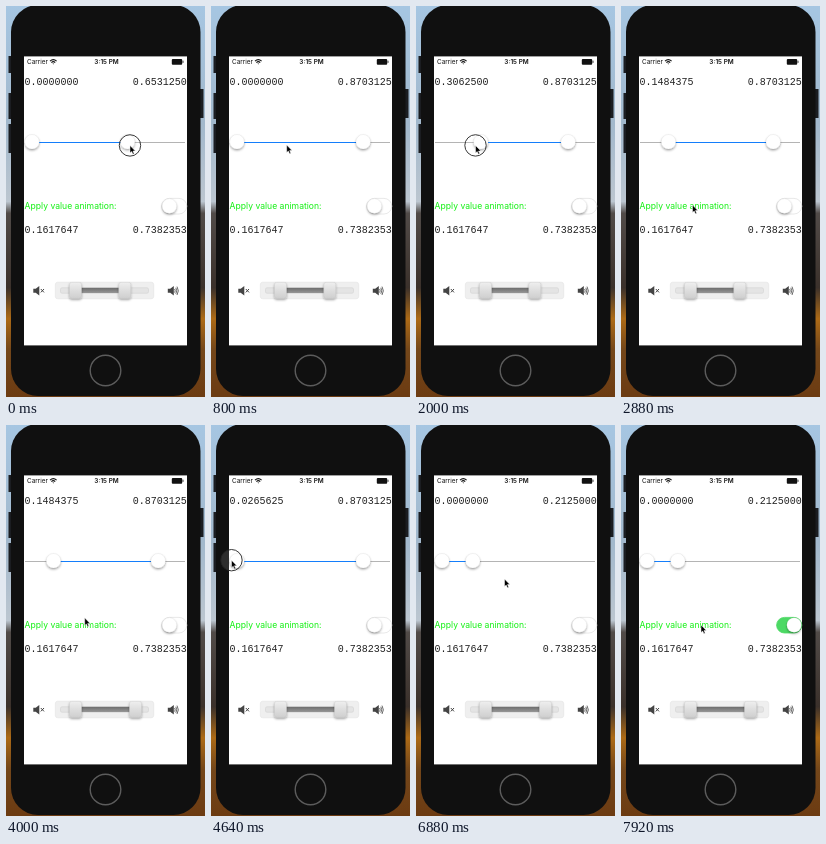
An HTML page that plays this animation: 199x391 px, repeating every 8 s.

```html
<!DOCTYPE html>
<html lang="en">
<head>
<meta charset="utf-8">
<title>Range sliders</title>
<style>
html, body { margin: 0; width: 100%; height: 100%; overflow: hidden; background: #8ea8bd; }
svg { display: block; width: 100vw; height: 100vh; }
text { font-family: Inter, Roboto, sans-serif; }
.num { font: 10px "Liberation Mono", "Courier New", monospace; fill: #222; }
.status { font-size: 6.4px; fill: #111; }
</style>
</head>
<body>
<svg viewBox="0 0 199 391" xmlns="http://www.w3.org/2000/svg">
  <defs>
    <linearGradient id="sky" x2="0" y2="1">
      <stop offset="0" stop-color="#a6c6e2"/>
      <stop offset=".3" stop-color="#a2b8cc"/>
      <stop offset=".5" stop-color="#bcc6d0"/>
      <stop offset=".53" stop-color="#514b48"/>
      <stop offset=".72" stop-color="#3b312b"/>
      <stop offset=".8" stop-color="#ac6a16"/>
      <stop offset=".88" stop-color="#74471a"/>
      <stop offset="1" stop-color="#6c3b12"/>
    </linearGradient>
    <linearGradient id="metal" x2="0" y2="1">
      <stop offset="0" stop-color="#efefef"/>
      <stop offset=".5" stop-color="#dedede"/>
      <stop offset="1" stop-color="#cfcfcf"/>
    </linearGradient>
    <linearGradient id="bar" x2="0" y2="1">
      <stop offset="0" stop-color="#6c6c6c"/>
      <stop offset="1" stop-color="#979797"/>
    </linearGradient>
    <filter id="shadow" x="-50%" y="-50%" width="200%" height="220%">
      <feDropShadow dx="0" dy="1.4" stdDeviation="1.2" flood-color="#000" flood-opacity=".36"/>
    </filter>
    <circle id="knob" r="7.3" fill="#fff" stroke="#000" stroke-opacity=".12" stroke-width=".4" filter="url(#shadow)"/>
    <rect id="grip" x="-6" y="276.3" width="12" height="16" rx="2.2" fill="url(#metal)" stroke="#c4c4c4" stroke-width=".4" filter="url(#shadow)"/>
    <path id="speaker" d="M0 -2H2.4L6 -4.8V4.8L2.4 2H0Z" fill="#444"/>
  </defs>

  <rect width="199" height="391" fill="url(#sky)"/>
  <path d="M2.5 50h4v17h-4zM2.5 87h4v26h-4zM2.5 118h4v29h-4zM193 83h4.5v29h-4.5z" fill="#1b1d21"/>
  <rect x="5" y="-1" width="189.5" height="391" rx="27" fill="#101010"/>
  <circle cx="99.5" cy="364.5" r="15.3" fill="none" stroke="#5c5c5c" stroke-width="1.4"/>
  <rect x="18" y="50.4" width="163" height="289" fill="#fff"/>

  <text class="status" x="21" y="58.2">Carrier</text>
  <g fill="none" stroke="#111" stroke-width="1.1">
    <path d="M44 55.1Q47.3 52 50.6 55.1M45.4 56.6Q47.3 54.8 49.2 56.6"/>
    <path d="M46.5 57.4H48.1L47.3 58.4Z" fill="#111" stroke="none"/>
  </g>
  <text class="status" x="100.5" y="58.2" text-anchor="middle" font-weight="600">3:15 PM</text>
  <rect x="165.8" y="52.9" width="10.4" height="5.8" rx="1" fill="#111"/>
  <path d="M177 54.7v2.2" stroke="#111" stroke-width=".8"/>

  <text class="num" id="loText" x="18.5" y="78.5"></text>
  <text class="num" id="hiText" x="180.7" y="78.5" text-anchor="end"></text>
  <path d="M19 136.5H179" stroke="#b4b4b4"/>
  <path id="range" stroke="#147efb"/>
  <use href="#knob" id="lo"/>
  <use href="#knob" id="hi"/>

  <text x="18.6" y="203.4" font-size="8.6" fill="#12f012">Apply value animation:</text>
  <rect id="track" x="155.6" y="192.4" width="25.2" height="15.6" rx="7.8" stroke-width=".8"/>
  <use href="#knob" id="toggle"/>

  <text class="num" x="18.5" y="226.5">0.1617647</text>
  <text class="num" x="180.7" y="226.5" text-anchor="end">0.7382353</text>

  <use href="#speaker" x="27.3" y="284.8"/>
  <path d="M34.8 283l3.2 3.4m0-3.4l-3.2 3.4" stroke="#444" stroke-width="1"/>
  <use href="#speaker" x="161.8" y="284.8"/>
  <path d="M168.6 283q1.2 1.8 0 3.6M169.8 281.8q2 3 0 6M171 280.6q2.7 4.2 0 8.4" fill="none" stroke="#444" stroke-width=".8"/>
  <rect x="49.3" y="276.2" width="98.4" height="16.6" rx="2.5" fill="#efefef" stroke="#e2e2e2" stroke-width=".6"/>
  <rect x="54.5" y="281.8" width="88" height="5.4" rx="1.5" fill="#e4e4e4" stroke="#d2d2d2" stroke-width=".6"/>
  <rect id="bar2" x="69.5" y="281.8" height="5.2" fill="url(#bar)"/>
  <use href="#grip" x="69.5"/>
  <use href="#grip" id="grip2"/>

  <g id="cursor">
    <circle id="press" r="10.7" fill="#fff" fill-opacity=".12" stroke="#222" stroke-width=".9"/>
    <path d="M0 0V7.6L1.7 6.1L2.9 8.8L4.2 8.2L3 5.6H5.4Z" fill="#000" stroke="#fff" stroke-width=".5"/>
  </g>
</svg>
<script>
const LOOP = 8000, FRAME = 80, LAG = 40;
const LEFT = 26, SPAN = 145;
const el = id => document.getElementById(id);
const clamp = u => Math.min(1, Math.max(0, u));
const smooth = u => u * u * (3 - 2 * u);
const xOf = v => LEFT + v * SPAN;

// Each step glides the pointer to (x, y); a named knob is dragged along.
const step = (from, to, x, y, knob) => ({ from, to, x, y, knob });
const steps = [
  step(-80, 320, xOf(.8703125), 139, "hi"),
  step(480, 1040, xOf(0), 139),
  step(1120, 1640, xOf(.4454), 140.5, "lo"),
  step(1700, 2160, xOf(.1484375), 139, "lo"),
  step(2320, 2880, 71.5, 199),
  step(2880, 3160, 118.8, 284),
  step(3240, 3520, 129.5, 284, "grip"),
  step(3640, 4260, xOf(.1484375), 137),
  step(4380, 4700, xOf(-.057), 135, "lo"),
  step(4880, 5720, xOf(.8703125), 137.7),
  step(5920, 6180, xOf(.2125), 138, "hi"),
  step(6320, 6800, 88.5, 154),
  step(6960, 7280, 168, 200),
  step(7320, 7400, 168, 200, "toggle"),
  step(7440, 7900, 80, 200)
];
const drags = steps.filter(s => s.knob);

const glide = (list, axis, start, t) => list.reduce(
  (v, s) => v + (s[axis] - v) * smooth(clamp((t - s.from) / (s.to - s.from))), start);
const knobX = (knob, start, t) => glide(drags.filter(s => s.knob === knob), "x", start, t);
const loAt = t => clamp((knobX("lo", LEFT, t) - LEFT) / SPAN);
const hiAt = t => clamp((knobX("hi", xOf(.653125), t) - LEFT) / SPAN);

const label = v => (Math.round(v * 640) / 640).toFixed(7);
const place = (id, x, y = 0) => el(id).setAttribute("transform", `translate(${x} ${y})`);

// Knobs trail the pointer, and the printed values trail the knobs.
function draw(t) {
  const lo = xOf(loAt(t - LAG)), hi = xOf(hiAt(t - LAG));
  el("loText").textContent = label(loAt(t - 2 * LAG));
  el("hiText").textContent = label(hiAt(t - 2 * LAG));
  el("range").setAttribute("d", `M${lo} 136.5H${hi}`);
  place("lo", lo, 135.8);
  place("hi", hi, 135.8);

  const grip = knobX("grip", 118.8, t - LAG);
  el("bar2").setAttribute("width", grip - 69.5);
  place("grip2", grip);

  const on = smooth(clamp((t - 7360) / 240));
  const mix = (a, b) => Math.round(a + (b - a) * on);
  const tint = off => `rgb(${mix(off, 76)},${mix(off, 217)},${mix(off, 100)})`;
  el("track").setAttribute("fill", tint(255));
  el("track").setAttribute("stroke", tint(226));
  place("toggle", 163.4 + on * 9.7, 200);

  place("cursor", glide(steps, "x", xOf(.653125), t), glide(steps, "y", 139.5, t));
  const down = drags.some(s => t >= s.from - FRAME && t <= s.to + FRAME);
  el("press").setAttribute("visibility", down ? "visible" : "hidden");
}

const start = performance.now();
function tick() {
  const t = (performance.now() - start) % LOOP;
  draw(Math.floor(t / FRAME) * FRAME);
  requestAnimationFrame(tick);
}
tick();
</script>
</body>
</html>
```
